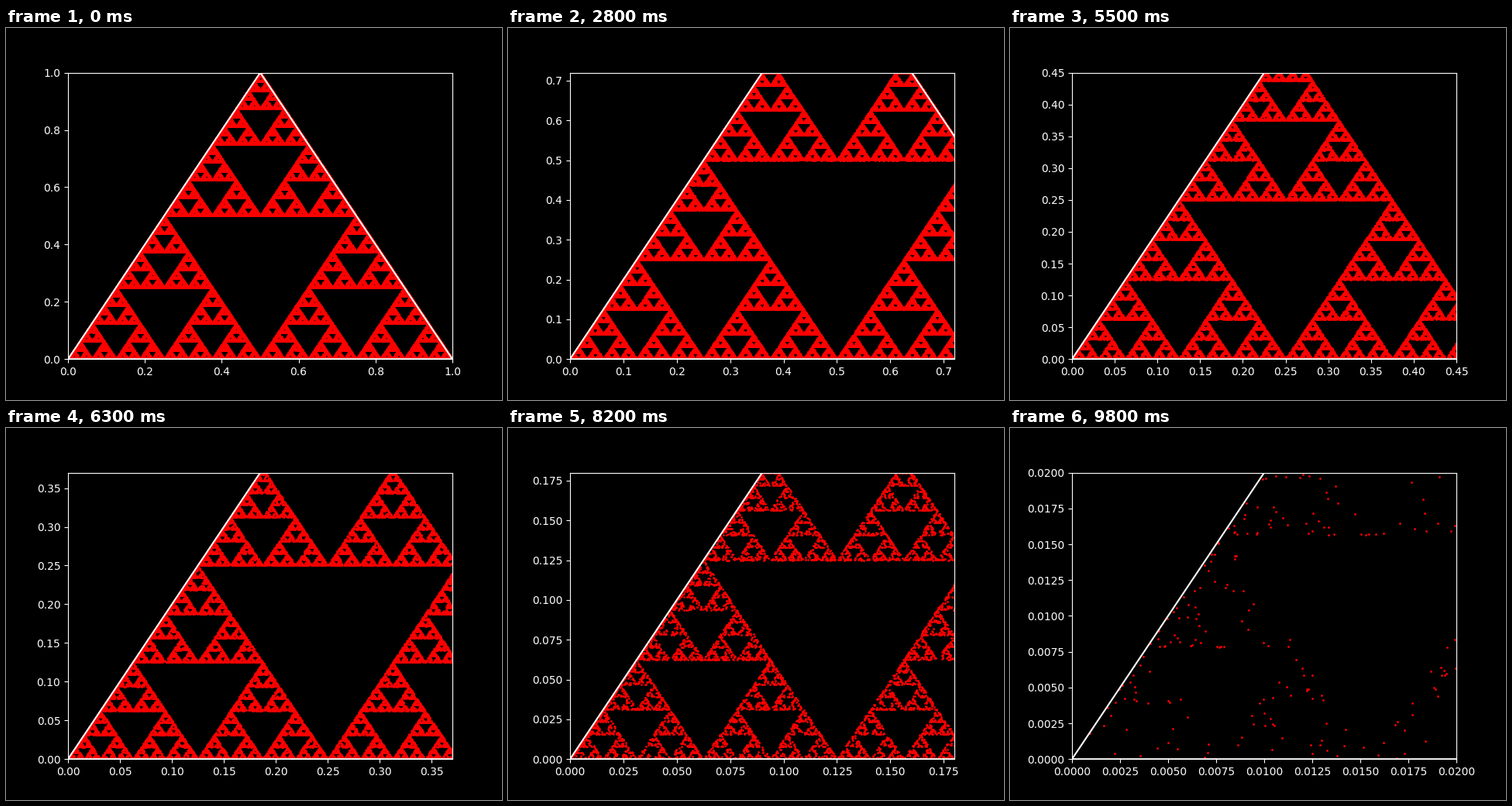
A matplotlib script for the animation above (9.9 s loop, 640 by 480 pixels).

```python
import numpy as np
import matplotlib.pyplot as plt
from matplotlib.animation import FuncAnimation

FRAMES = 99
INTERVAL = 100
POINTS = 100_000
DEPTH = 40
CORNERS = np.array([(0, 0), (0.5, 1), (1, 0)])


def chaos_game(count, seed=1):
    """Points reached by jumping halfway to a random corner each time."""
    rng = np.random.default_rng(seed)
    picks = CORNERS[rng.integers(0, 3, count + DEPTH - 1)]
    weights = 0.5 ** np.arange(1, DEPTH + 1)
    return [np.convolve(picks[:, axis], weights, mode="valid") for axis in (0, 1)]


plt.style.use("dark_background")
plt.rcParams["font.family"] = "DejaVu Sans"

fig, ax = plt.subplots(figsize=(6.4, 4.8), dpi=100)
x, y = chaos_game(POINTS)
ax.plot(x, y, "o", color="red", markersize=1)
outline = np.vstack([CORNERS, CORNERS[:1]])
ax.plot(outline[:, 0], outline[:, 1], color="white", linewidth=1.5)


def zoom(frame):
    limit = 1 - frame / 100
    ax.set_xlim(0, limit)
    ax.set_ylim(0, limit)
    return []


anim = FuncAnimation(fig, zoom, frames=FRAMES, interval=INTERVAL,
                     init_func=lambda: zoom(0), repeat=True, repeat_delay=0)
plt.show()
```
